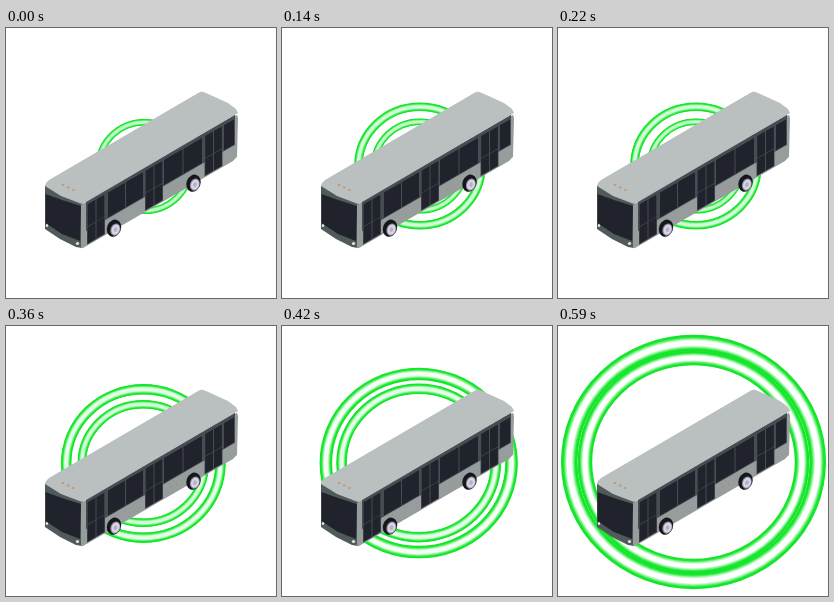
An HTML page with a canvas for the animation above (0.69 s loop, 270 px wide and 270 px high).

```html
<!DOCTYPE html>
<html>
<head>
<meta charset="utf-8">
<style>
html, body { margin: 0; width: 100%; height: 100%; overflow: hidden; background: #fff; }
canvas { display: block; }
</style>
</head>
<body>
<canvas id="stage" width="270" height="270"></canvas>
<script>
const ctx = document.getElementById('stage').getContext('2d');
const starts = [0, 140, 280, 420, 510, 590];
const LOOP = 690;
const GLASS = '#20232b', FRAME = '#464c51', BODY = '#979d9d', ROOF = '#babfc0';

function poly(color, ...pts) {
  ctx.fillStyle = color;
  ctx.beginPath();
  for (let i = 0; i < pts.length; i += 2) ctx.lineTo(pts[i], pts[i + 1]);
  ctx.fill();
}

function oval(color, x, y, rx, ry, tilt = 0) {
  ctx.fillStyle = color;
  ctx.beginPath();
  ctx.ellipse(x, y, rx, ry, tilt, 0, 7);
  ctx.fill();
}

function pane(x, y, w, h, color = GLASS) {
  ctx.fillStyle = color;
  ctx.fillRect(x, y, w, h);
}

// Tube-like ring that grows with its age: green rims, pale middle
function ring(x, y, age) {
  const w = 6.5 + 2 * age;
  const rx = 49 + 16.7 * age - w / 2, ry = 47.5 + 15.95 * age - w / 2;
  const core = Math.min(1, 0.75 + 0.07 * age), n = 12;
  for (let i = 0; i <= n; i++) {
    const k = core * Math.min(1, Math.max(0, (i / n - 0.25) / 0.5));
    ctx.strokeStyle = `rgb(${20 + 235 * k}, ${230 + 25 * k}, ${42 + 213 * k})`;
    ctx.lineWidth = w * (1 - i / (n + 1));
    ctx.beginPath();
    ctx.ellipse(x, y, rx, ry, 0, 0, 7);
    ctx.stroke();
  }
}

function doors(x) {
  pane(x, 0, 18, 41, FRAME);
  for (const dx of [0.7, 9.5]) {
    pane(x + dx, 1, 7.8, 22);
    pane(x + dx, 23.7, 7.8, 16.5);
  }
}

function windows(x, end, count) {
  const w = (end - x) / count;
  for (let i = 0; i < count; i++) pane(x + i * w, 1, w - 1, 25);
}

function wheel(x, y) {
  oval('#15171c', x - 0.5, y - 0.8, 7, 8.8, 0.35);
  oval('#8d8998', x + 0.8, y + 0.6, 4.8, 6.3, 0.35);
  oval('#d9d4e5', x + 1, y + 0.7, 3.9, 5.2, 0.35);
  oval('#b5b0c4', x + 1, y + 0.7, 1.8, 2.4, 0.35);
}

function bus() {
  // Side, sheared along the body
  ctx.save();
  ctx.transform(1, -0.58, 0, 1, 77, 178);
  poly(BODY, -2, -2, 154, -2, 155, 2, 154, 40, 150, 42, 0, 42, -2, 41);
  pane(3, -3, 149, 30, FRAME);
  windows(25, 61, 2);
  windows(81, 120, 2);
  windows(141, 152, 1);
  [4, 62, 121.5].forEach(doors);
  for (const x of [87, 93]) pane(x, 34, 1.5, 1.5, '#b98779');
  ctx.restore();

  // Front
  poly('#505a59', 39, 157, 77, 174, 76, 220, 70, 219, 54, 211, 39, 201);
  poly(BODY, 75, 177, 80, 174, 79, 218, 75, 220);
  poly(GLASS, 39.5, 166, 56, 172, 75, 178, 74, 213, 56, 206, 39.5, 195);
  oval('#e3e5e3', 41, 197.5, 1.2, 1.5);
  oval('#e3e5e3', 71.5, 215.5, 1.6, 1.5);

  // Roof
  poly(ROOF, 39, 158, 40, 155, 43, 152, 193, 64.5, 196, 63.5, 200, 65,
    222, 75, 230, 81, 232, 85, 81, 173.5, 76, 176, 55, 168);
  for (let i = 0; i < 3; i++) oval('#c99468', 57 + 5.2 * i, 157 + 2.5 * i, 1.4, 0.9);

  wheel(108.5, 201);
  wheel(188, 156);
}

function frame(t) {
  const step = starts.filter(s => s <= t).length - 1;
  const x = 138.5 - 0.6 * step, y = 138.5 - 0.5 * step;
  ctx.fillStyle = '#fff';
  ctx.fillRect(0, 0, 270, 270);
  if (step) ring(x, y, step - 1);
  ring(x, y, step);
  bus();
}

const begin = performance.now();
function tick() {
  frame((performance.now() - begin) % LOOP);
  requestAnimationFrame(tick);
}
tick();
</script>
</body>
</html>
```
